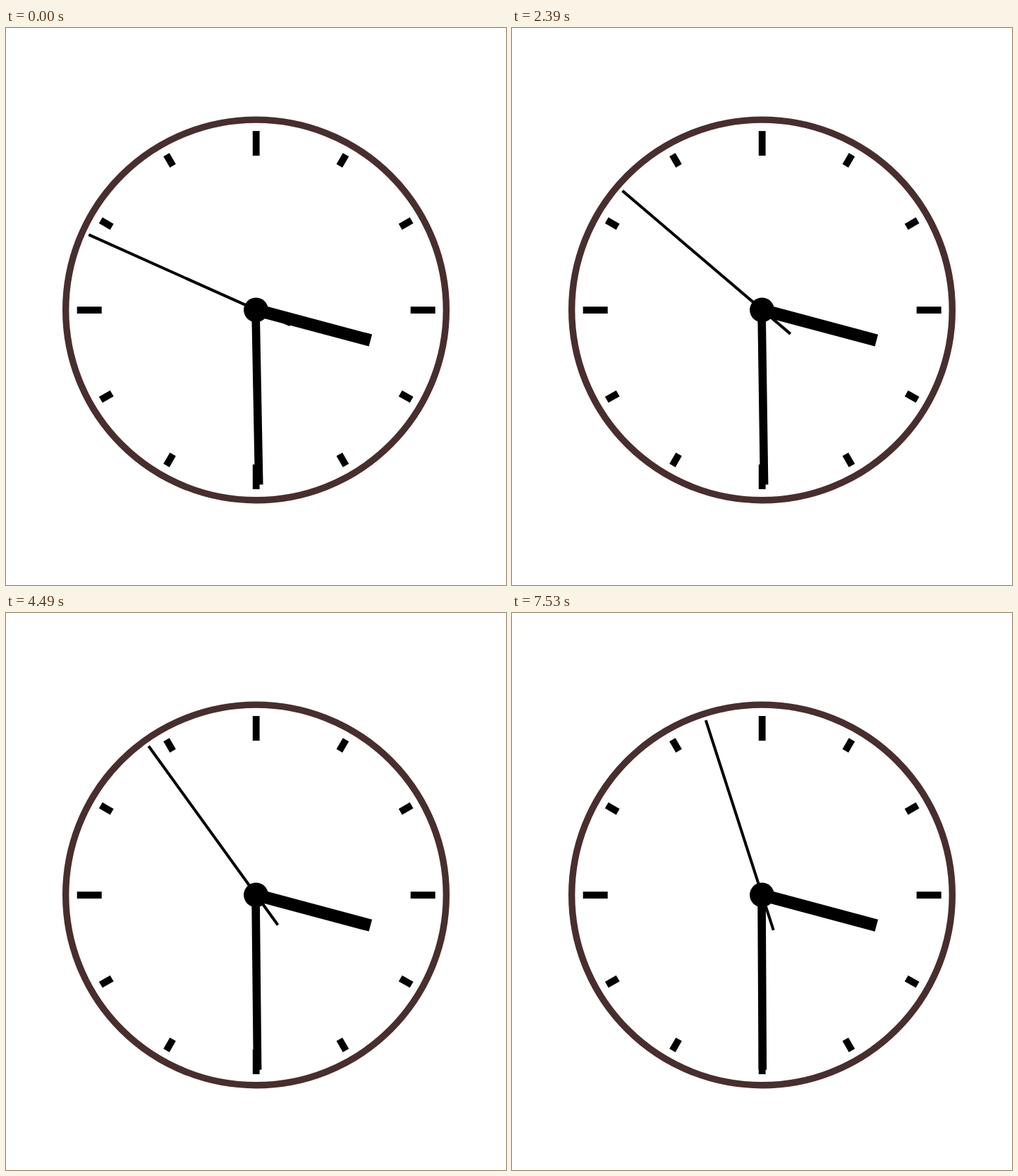
These frames come from a looping animation (709 px wide and 790 px high, 7.99 s). An HTML page:

```html
<!DOCTYPE html>
<html lang="en">
<head>
<meta charset="utf-8">
<title>Clock</title>
<style>
  html, body { margin: 0; width: 100%; height: 100%; overflow: hidden; background: #fff; }
  svg { display: block; width: 100%; height: 100%; }
</style>
</head>
<body>
<svg viewBox="0 0 709 790">
  <circle cx="354.5" cy="399.9" r="269.8" fill="none" stroke="#482e2e" stroke-width="9.4"/>
  <g id="marks" transform="translate(354.7 400.1)"></g>
  <rect id="hour" x="-8.75" y="-168" width="17.5" height="168"/>
  <rect id="minute" x="-5.8" y="-248" width="11.6" height="248"/>
  <rect id="second" x="-2" y="-260" width="4" height="313"/>
  <circle cx="354.5" cy="399.9" r="17.4"/>
</svg>
<script>
  const LOOP = 7990, TICKS = 8;
  const FRAME = 77.8, LEAD = 28;         // stepping interval and its phase, in ms
  const FRAMES_PER_TICK = 1000 / FRAME;
  const MOVE = 7;                        // jumps the second hand makes per tick
  const get = id => document.getElementById(id);

  // Twelve hour marks, longer at the quarters.
  for (let i = 0; i < 12; i++) {
    const [inner, length] = i % 3 ? [236.2, 18.3] : [219, 35];
    get('marks').innerHTML +=
      `<rect x="-4.9" y="${-inner - length}" width="9.8" height="${length}" transform="rotate(${i * 30})"/>`;
  }

  function turn(id, x, y, angle) {
    get(id).setAttribute('transform', `translate(${x} ${y}) rotate(${angle})`);
  }

  // Each tick is a short run of equal jumps followed by a rest.
  function secondsAt(t) {
    const frame = Math.floor((t + LEAD) / FRAME);
    let seconds = 49;
    for (let i = 0; i < TICKS; i++) {
      const jumps = frame - Math.round(i * FRAMES_PER_TICK);
      seconds += Math.min(1, Math.max(0, jumps / MOVE));
    }
    return seconds;
  }

  const origin = performance.now();
  function draw() {
    const seconds = secondsAt((performance.now() - origin) % LOOP);
    turn('second', 354.5, 399.5, seconds * 6 + 0.15);
    turn('minute', 354, 399.7, 174 + seconds / 10);
    turn('hour', 354.5, 399.8, 104.5 + seconds / 120);
    requestAnimationFrame(draw);
  }
  draw();
</script>
</body>
</html>
```
